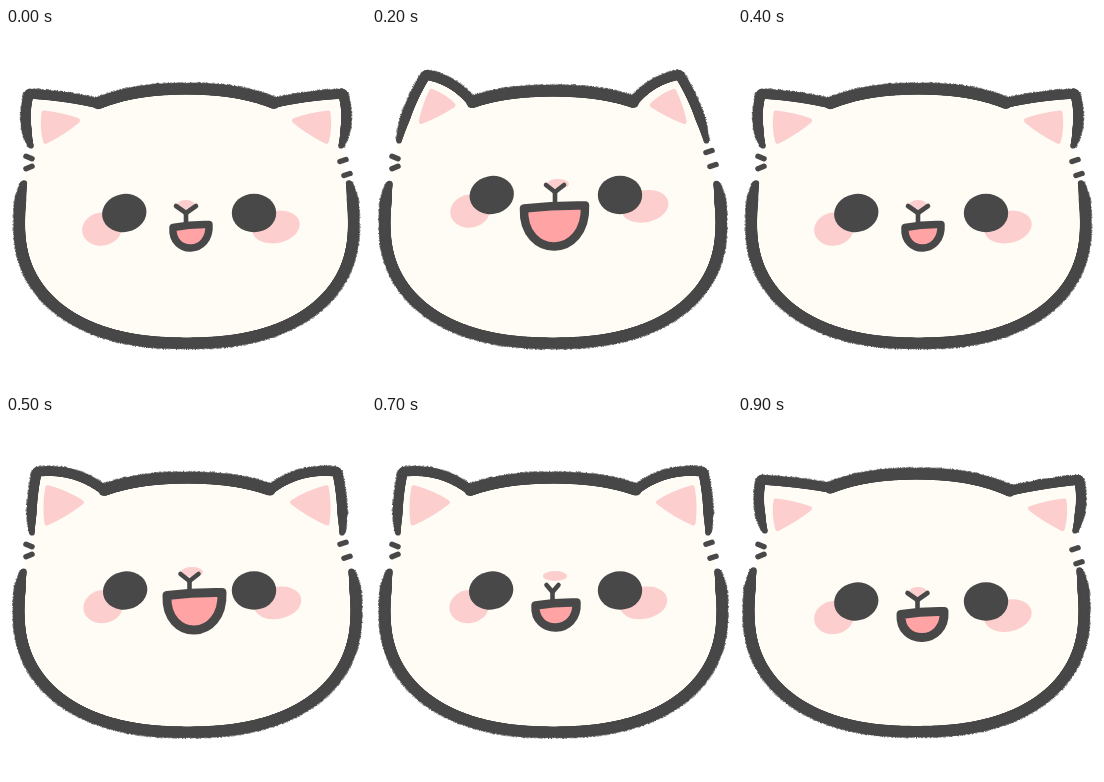
Write an HTML page with a canvas that moves like this. It is 360 px wide and 360 px high and loops after 1000 ms.

```html
<!DOCTYPE html>
<html lang="en">
<head>
<meta charset="utf-8">
<title>Cat face</title>
<style>
html, body { margin: 0; width: 100%; height: 100%; overflow: hidden; background: #fff; }
canvas { display: block; width: 100vw; height: 100vh; }
</style>
</head>
<body>
<canvas id="stage" width="360" height="360"></canvas>
<script>
const ctx = document.getElementById('stage').getContext('2d');
const INK = '#484848', CREAM = '#fffcf5', BLUSH = '#fccfce', TONGUE = '#ffa3a5';
const STEP = 100, CY = 195, BEND = 2.3;

// The head is a superellipse around (cx, CY). Ears are given on the left
// and mirrored at the axis; bulge rounds their side and top.
const low = {
  cx: 180.5, rx: 167, crown: 61, chin: 315, eyes: 185, axis: 180,
  end: [25, 118], tip: [23, 66], join: 92, bulge: [8, 3],
  pink: [[36, 83], [75, 92], [38, 116]]
};
const mid = {
  cx: 181.5, rx: 168.5, crown: 62, chin: 316, eyes: 174.5, axis: 181,
  end: [26, 117], tip: [31, 56], join: 98, bulge: [4, 14],
  pink: [[40, 69], [79, 86], [39, 110]]
};
const high = {
  cx: 181, rx: 168, crown: 63, chin: 315, eyes: 167, axis: 180.7,
  end: [27, 113], tip: [54, 47], join: 100, bulge: [6, 10],
  pink: [[59, 61], [84, 77], [47, 96]]
};
const dip = {
  cx: 178.5, rx: 167.5, crown: 58, chin: 315.5, eyes: 185.5, axis: 182,
  end: [27, 115], tip: [23, 64], join: 92, bulge: [7, 2],
  pink: [[36, 83], [75, 92], [38, 115]]
};

// nose: x, y, rx; nib: tip x, y, stem end, half width; lips: x, top, half width, bottom, weight
const tiny   = { nose: [180, 177, 9],  nib: [180, 185, 196, 10],   lips: [185, 198, 18, 220, 7.5] };
const wide   = { nose: [186, 156, 11], nib: [183.5, 165, 174, 9],  lips: [188.5, 178, 27.5, 214, 9] };
const huge   = { nose: [186, 156, 11], nib: [183, 164, 175, 9],    lips: [182.5, 179, 30.5, 218.5, 8.5] };
const small  = { nose: [186, 158, 11], nib: [183, 171, 178, 9],    lips: [185, 182, 17, 199, 7.5] };
const medium = { nose: [183, 160, 12], nib: [180.5, 176, 184, 6],  lips: [184, 188, 20.5, 211.5, 8.5] };
const smirk  = { nose: [180, 176, 9],  nib: [179.5, 184, 194, 10], lips: [184.5, 197, 21.5, 221.5, 9] };

const steps = [
  [low, tiny], [mid, wide], [high, huge], [mid, small], [low, tiny],
  [mid, wide], [high, huge], [mid, medium], [low, tiny], [dip, smirk]
];

function seeded(seed) {
  return () => (seed = (seed * 16807) % 2147483647) / 2147483647;
}

function trace(count, at) {
  return Array.from({ length: count + 1 }, (_, i) => at(i / count));
}

function rim(h, angle) {
  const bow = v => Math.sign(v) * Math.abs(v) ** (2 / BEND);
  const s = Math.sin(angle);
  return [h.cx + h.rx * bow(Math.cos(angle)), CY + (s < 0 ? CY - h.crown : h.chin - CY) * bow(s)];
}

// Angle at which the upper rim passes x
function rimAngle(h, x) {
  const d = (x - h.cx) / h.rx;
  return -Math.acos(Math.sign(d) * Math.abs(d) ** (BEND / 2));
}

// Curve from p to q, bowed outwards
function arch(p, q, bulge) {
  const dx = q[0] - p[0], dy = q[1] - p[1], k = bulge / Math.hypot(dx, dy);
  const c = [(p[0] + q[0]) / 2 + dy * k, (p[1] + q[1]) / 2 - dx * k];
  return trace(70, t => [0, 1].map(m =>
    (1 - t) ** 2 * p[m] + 2 * t * (1 - t) * c[m] + t * t * q[m]));
}

function oval(x, y, rx, ry, tilt, color) {
  ctx.fillStyle = color;
  ctx.beginPath();
  ctx.ellipse(x, y, rx, ry, tilt, 0, 7);
  ctx.fill();
}

function line(...points) {
  ctx.beginPath();
  points.forEach(p => ctx.lineTo(p[0], p[1]));
  ctx.stroke();
}

// Brush line with a bristly outer side; thinner at the chosen ends
function brush(points, width, thinStart, thinEnd, rand) {
  const last = points.length - 1;
  ctx.fillStyle = ctx.strokeStyle = INK;
  ctx.lineWidth = 1;
  points.forEach(([x, y], i) => {
    const near = Math.min(thinStart ? i : 99, thinEnd ? last - i : 99);
    const r = width / 2 * Math.min(1, .55 + near / 50);
    ctx.beginPath();
    ctx.arc(x, y, r, 0, 7);
    ctx.fill();
    const p = points[Math.max(0, i - 1)], q = points[Math.min(last, i + 1)];
    const dx = q[0] - p[0], dy = q[1] - p[1];
    const reach = (r + rand() * 1.2) / (Math.hypot(dx, dy) || 1);
    line([x, y], [x + dy * reach, y - dx * reach]);
  });
}

// Soft triangle with slightly bowed sides
function softTriangle(points) {
  const mean = m => points.reduce((sum, p) => sum + p[m], 0) / 3;
  const [mx, my] = [mean(0), mean(1)];
  const inset = points.map(([x, y]) => [mx + (x - mx) * .86, my + (y - my) * .86]);
  ctx.fillStyle = ctx.strokeStyle = BLUSH;
  ctx.lineWidth = 5;
  ctx.beginPath();
  ctx.moveTo(...inset[0]);
  inset.forEach(([x, y], i) => {
    const [u, v] = inset[(i + 1) % 3], hx = (x + u) / 2, hy = (y + v) / 2;
    ctx.quadraticCurveTo(hx + (hx - mx) * .25, hy + (hy - my) * .25, u, v);
  });
  ctx.closePath();
  ctx.fill();
  ctx.stroke();
}

function drawHead(h) {
  const rand = seeded(h.eyes * 20);
  const mirror = ([x, y]) => [2 * h.axis - x, y];
  const from = rimAngle(h, h.join), to = rimAngle(h, 2 * h.axis - h.join);
  const top = trace(180, t => rim(h, from + (to - from) * t));
  const body = trace(650, t => rim(h, -.25 + (Math.PI + .5) * t));
  const ear = join => [...arch(h.end, h.tip, h.bulge[0]), ...arch(h.tip, join, h.bulge[1])];
  const left = ear(top[0]);
  const right = ear(mirror(top[180])).map(mirror).reverse();

  ctx.fillStyle = CREAM;
  ctx.beginPath();
  [...left, ...top, ...right, ...body].forEach(p => ctx.lineTo(p[0], p[1]));
  ctx.fill();
  softTriangle(h.pink);
  softTriangle(h.pink.map(mirror));
  brush(left, 9.5, true, false, rand);
  brush(top, 11.5, false, false, rand);
  brush(right, 9.5, false, true, rand);
  brush(body, 11.2, true, true, rand);

  const rise = 185 - h.eyes;
  ctx.strokeStyle = INK;
  ctx.lineWidth = 5.5;
  for (const k of [0, 1]) {
    const y = 129.5 + 10 * k, slope = 1.2 - 2.4 * k;
    line([20, y - slope], [26, y + slope]);
    const x = 337 + 4 * k, v = y + 3 + 4 * k - rise * .5;
    line([x - 3, v + 1], [x + 3, v - 1]);
  }

  oval(96 + rise * .12, h.eyes + 16, 20, 16.5, -.2, BLUSH);
  oval(270 + rise * .15, h.eyes + 14 - rise * .15, 24, 16, -.2, BLUSH);
  oval(118.3 + rise * .08, h.eyes, 22.3, 19, -.2, INK);
  oval(248, h.eyes, 22.2, 19.3, 0, INK);
}

function drawMuzzle({ nose, nib, lips }) {
  oval(nose[0], nose[1], nose[2], 5, 0, BLUSH);
  const [tx, ty, end, half] = nib;
  ctx.lineWidth = 4.6;
  line([tx - half, ty - 7], [tx, ty], [tx + half, ty - 7]);
  line([tx, ty], [tx, end]);

  const [x, y, reach, low, weight] = lips;
  const pull = y + (low - y) * 4 / 3;
  ctx.lineWidth = weight;
  ctx.fillStyle = TONGUE;
  ctx.beginPath();
  ctx.moveTo(x - reach, y + 1.5);
  ctx.quadraticCurveTo(x, y - 2, x + reach, y - 1.5);
  ctx.bezierCurveTo(x + reach + 2, pull, x - reach - 2, pull, x - reach, y + 1.5);
  ctx.closePath();
  ctx.fill();
  ctx.stroke();
}

function draw(i) {
  const [head, muzzle] = steps[i];
  ctx.fillStyle = '#fff';
  ctx.fillRect(0, 0, 360, 360);
  ctx.lineCap = ctx.lineJoin = 'round';
  drawHead(head);
  drawMuzzle(muzzle);
}

let shown = -1;
const start = performance.now();
function tick() {
  const t = Math.max(0, performance.now() - start);
  const i = Math.floor(t / STEP) % steps.length;
  if (i !== shown) draw(shown = i);
  requestAnimationFrame(tick);
}
tick();
</script>
</body>
</html>
```
